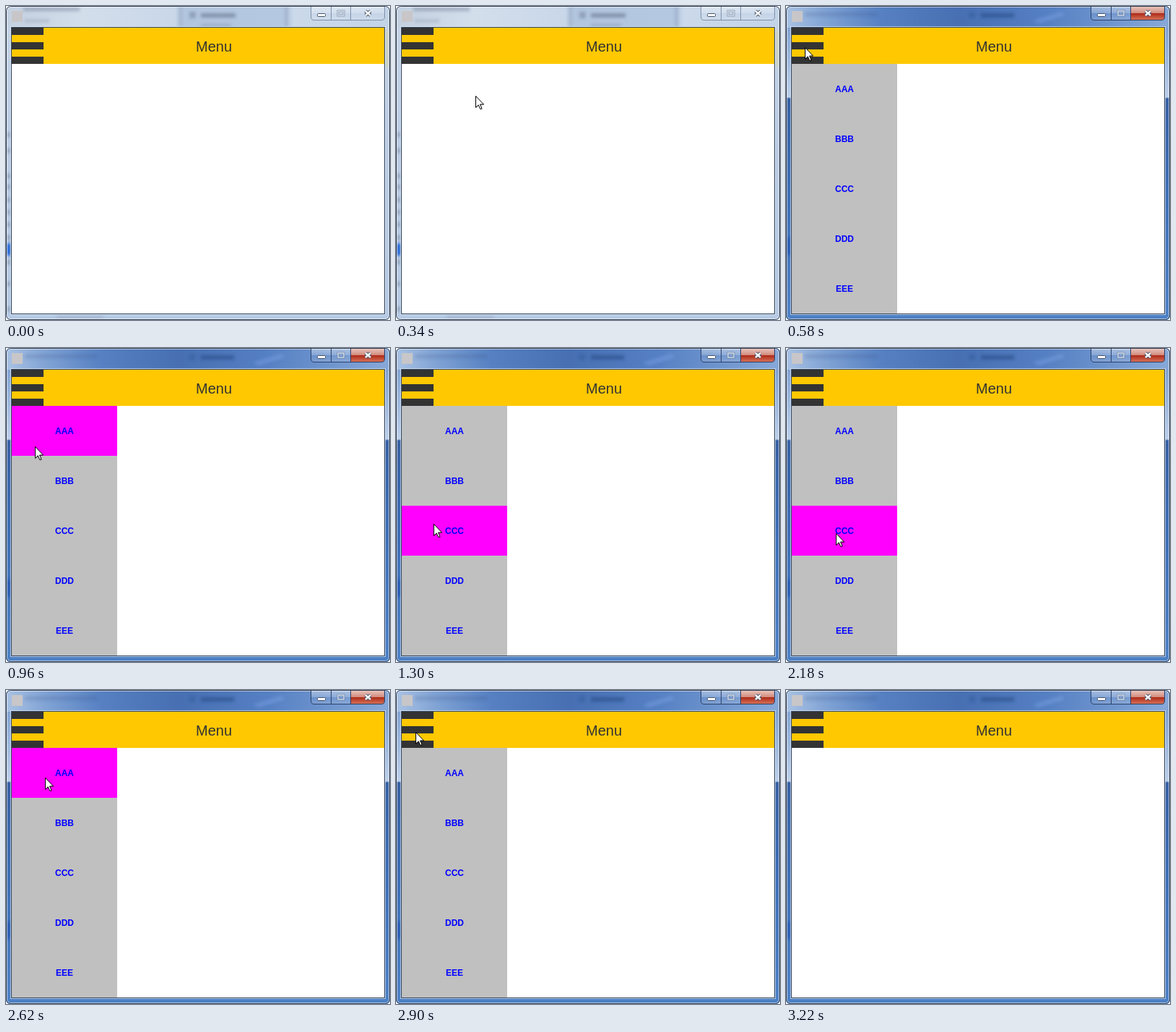
Write an HTML page that moves like this. It is 532 px wide and 434 px high and loops after 3.34 s.

```html
<!DOCTYPE html>
<html lang="en">
<head>
<meta charset="utf-8">
<title>Menu</title>
<style>
  html, body { margin: 0; width: 100%; height: 100%; overflow: hidden; background: #fff; }
  svg { display: block; width: 532px; height: 434px; }
  text { font-family: "Liberation Sans", Arial, sans-serif; text-anchor: middle; }
  .title { font-size: 20px; fill: #333; }
  .item { font-size: 12px; font-weight: bold; fill: #00f; }
</style>
</head>
<body>
<svg viewBox="0 0 532 434">
  <defs>
    <linearGradient id="barOff">
      <stop offset="0" stop-color="#c3d0e0"/><stop offset=".2" stop-color="#d3deeb"/>
      <stop offset=".44" stop-color="#c9d7e9"/><stop offset=".46" stop-color="#b3c6df"/>
      <stop offset=".73" stop-color="#b5c8e1"/><stop offset=".75" stop-color="#cbd9ea"/>
      <stop offset="1" stop-color="#c3d3e7"/>
    </linearGradient>
    <linearGradient id="barOn">
      <stop offset="0" stop-color="#a9c2e3"/><stop offset=".1" stop-color="#82a4d5"/>
      <stop offset=".25" stop-color="#5680c2"/><stop offset=".45" stop-color="#476fb2"/>
      <stop offset=".68" stop-color="#5580c3"/><stop offset="1" stop-color="#88a9d8"/>
    </linearGradient>
    <linearGradient id="sideOff" x2="0" y2="1">
      <stop offset="0" stop-color="#c6d4e6"/><stop offset=".4" stop-color="#bccde4"/>
      <stop offset="1" stop-color="#b6cae4"/>
    </linearGradient>
    <linearGradient id="sideOn" x2="0" y2="1">
      <stop offset="0" stop-color="#7197cd"/><stop offset=".29" stop-color="#bdd0ea"/>
      <stop offset=".295" stop-color="#3862a5"/><stop offset=".6" stop-color="#3e70b8"/>
      <stop offset="1" stop-color="#4f83c8"/>
    </linearGradient>
    <linearGradient id="gloss" x2="0" y2="1">
      <stop offset="0" stop-color="#fff" stop-opacity=".4"/>
      <stop offset=".48" stop-color="#fff" stop-opacity=".2"/>
      <stop offset=".5" stop-color="#fff" stop-opacity="0"/>
      <stop offset="1" stop-color="#fff" stop-opacity=".15"/>
    </linearGradient>
    <linearGradient id="red" x2="0" y2="1">
      <stop offset="0" stop-color="#d99a8c"/><stop offset=".48" stop-color="#c66a58"/>
      <stop offset=".5" stop-color="#ad2a18"/><stop offset="1" stop-color="#cf5a3c"/>
    </linearGradient>
    <filter id="blur" x="-50%" y="-100%" width="200%" height="300%"><feGaussianBlur stdDeviation="2"/></filter>
    <clipPath id="frame"><rect width="532" height="434" rx="6"/></clipPath>
  </defs>

  <g clip-path="url(#frame)">
    <g id="off">
      <rect width="532" height="434" fill="url(#sideOff)"/>
      <rect width="532" height="30" fill="url(#barOff)"/>
      <g filter="url(#blur)" fill="#5c6c84">
        <rect x="24" y="2" width="78" height="5" opacity=".4"/>
        <rect x="26" y="18" width="34" height="5" opacity=".2"/>
        <rect x="254" y="8" width="9" height="9" opacity=".4"/>
        <rect x="270" y="10" width="48" height="6" opacity=".55"/>
        <rect x="270" y="25" width="42" height="4" opacity=".3"/>
        <rect x="240" y="0" width="3" height="29" opacity=".3"/>
        <rect x="387" y="0" width="3" height="29" opacity=".3"/>
        <g id="specks" opacity=".5"></g>
        <rect x="0" y="328" width="7" height="17" fill="#2468d8"/>
        <rect x="526" y="34" width="5" height="50" fill="#d8d4a0" opacity=".6"/>
        <rect x="70" y="428" width="65" height="4" opacity=".2"/>
      </g>
    </g>
    <g id="on">
      <rect width="532" height="434" fill="url(#sideOn)"/>
      <rect width="532" height="30" fill="url(#barOn)"/>
      <rect y="426" width="532" height="8" fill="#4c80c5"/>
      <g filter="url(#blur)" fill="#24457f">
        <rect x="26" y="9" width="100" height="5" opacity=".2"/>
        <rect x="254" y="9" width="8" height="7" opacity=".3"/>
        <rect x="270" y="10" width="46" height="6" opacity=".5"/>
        <path d="M342 20L382 8L386 13L350 24Z" fill="#7aa2e4" opacity=".5"/>
        <rect x="0" y="320" width="7" height="24" fill="#1d50b0" opacity=".6"/>
      </g>
    </g>
    <rect x="1.5" y="1.5" width="529" height="431" rx="5" fill="none" stroke="#fff" stroke-opacity=".6"/>
    <rect x=".5" y=".5" width="531" height="433" rx="6" fill="none" stroke="#2c3a4e"/>
  </g>

  <rect x="8" y="7" width="15" height="15" fill="#c8c6c8"/>

  <path id="close" d="M477.5 1H524.5V15Q524.5 19.5 520 19.5H477.5Z"/>
  <path d="M422.5 1H524.5V15Q524.5 19.5 520 19.5H427Q422.5 19.5 422.5 15Z" fill="url(#gloss)"/>
  <path id="edges" d="M422.5 1V15Q422.5 19.5 427 19.5H520Q524.5 19.5 524.5 15V1M450.5 1V19M477.5 1V19" fill="none"/>
  <rect x="431.5" y="10.5" width="11" height="4" rx="1" fill="#fff" stroke="#46536a"/>
  <g id="maxIcon" fill="none">
    <rect x="460" y="7" width="8" height="6" stroke="#63728a" stroke-width="3" opacity=".6"/>
    <rect x="460" y="7" width="8" height="6" stroke="#d3deed" stroke-width="1.4"/>
  </g>
  <g fill="none">
    <path d="M498 7L505 13M505 7L498 13" stroke="#46536a" stroke-width="4.5"/>
    <path d="M498 7L505 13M505 7L498 13" stroke="#fff" stroke-width="2.4"/>
  </g>

  <rect x="6.5" y="28.5" width="519" height="398" fill="none" stroke="#dbe7f5" stroke-opacity=".75"/>
  <rect x="7.5" y="29.5" width="517" height="396" fill="#fff" stroke="#33445c"/>
  <rect x="8" y="30" width="516" height="50" fill="#ffc800"/>
  <path d="M8 30h44v10h-44zM8 50h44v10h-44zM8 70h44v10h-44z" fill="#333"/>
  <text class="title" x="288" y="63">Menu</text>

  <g id="panel">
    <rect x="8" y="80" width="146" height="345" fill="#c0c0c0"/>
    <rect id="hover" x="8" width="146" height="69" fill="#f0f"/>
    <g id="items"></g>
  </g>

  <g id="cursor">
    <path d="M1.5 1.5V17.5L5 14L8 20L10 19L7.500 13H12.500Z" fill="#000" opacity=".2"/>
    <path d="M.5 .5V16.300L4.200 12.800L6.800 18.500L9 17.500L6.500 12H11.500Z" fill="#fff" stroke="#000"/>
  </g>
</svg>
<script>
const LOOP = 3340, STEP = 20, OPEN = 580, CLOSE = 2980;
const ROW = 69, TOP = 80, LEFT = 8, RIGHT = 154;
const $ = id => document.getElementById(id);

// Pointer stops: time, x, y
const path = [
  [20, 490, 424], [220, 236, 224], [420, 26, 57], [620, 26, 57],
  [820, 34, 92], [1100, 45, 180], [1300, 52, 243], [1640, 75, 369],
  [1680, 78, 375], [1820, 78, 375], [2180, 69, 256], [2300, 64, 222],
  [2380, 62, 206], [2620, 54, 121], [2880, 27, 58], [2980, 27, 58],
  [3080, 210, 200], [3200, 512, 424]
];

function add(parent, tag, attrs, label = '') {
  const el = document.createElementNS('http://www.w3.org/2000/svg', tag);
  for (const key in attrs) el.setAttribute(key, attrs[key]);
  el.textContent = label;
  parent.append(el);
}

[...'ABCDE'].forEach((c, i) =>
  add($('items'), 'text', { class: 'item', x: 81, y: 119 + i * ROW }, c.repeat(3)));

[178, 200, 235, 250, 268, 285, 302, 320, 354, 384, 419].forEach(y =>
  add($('specks'), 'rect', { x: 1, y: y - 3, width: 5, height: 6 }));

function pointerAt(t) {
  const i = path.findIndex(p => p[0] >= t);
  if (i < 0 || t < path[0][0]) return null;
  if (i === 0) return path[0].slice(1);
  const a = path[i - 1], b = path[i];
  const k = (t - a[0]) / (b[0] - a[0]);
  return [1, 2].map(n => Math.round(a[n] + (b[n] - a[n]) * k));
}

function show(id, visible) {
  $(id).style.display = visible ? '' : 'none';
}

function render(t) {
  const active = t >= OPEN;
  show('off', !active);
  show('on', active);
  $('close').setAttribute('fill', active ? 'url(#red)' : 'none');
  $('edges').setAttribute('stroke', active ? '#2b416b' : '#7f90aa');
  show('panel', active && t < CLOSE);

  const p = pointerAt(t);
  show('cursor', p);
  let row = -1;
  if (p) {
    $('cursor').setAttribute('transform', `translate(${p})`);
    if (p[0] >= LEFT && p[0] < RIGHT) row = Math.floor((p[1] - TOP) / ROW);
  }
  show('hover', row >= 0 && row < 5);
  $('hover').setAttribute('y', TOP + row * ROW);
}

const start = performance.now();
function tick(now) {
  const t = Math.max(0, now - start) % LOOP;
  render(Math.floor(t / STEP) * STEP);
  requestAnimationFrame(tick);
}
render(0);
requestAnimationFrame(tick);
</script>
</body>
</html>
```
